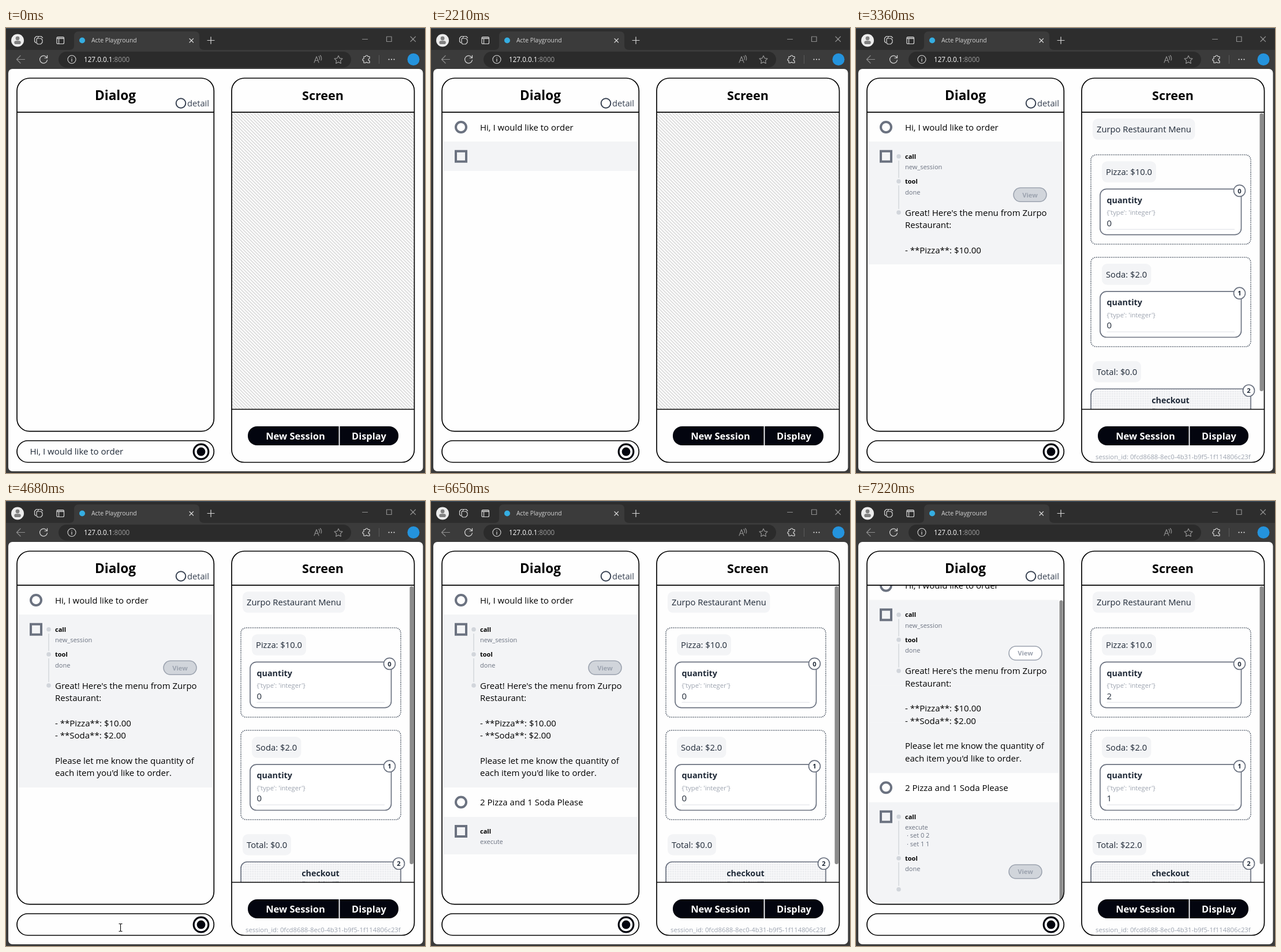
Write an HTML page that moves like this. It is 726x772 px and loops after 8000 ms.

```html
<!DOCTYPE html>
<html lang="en">
<head>
<meta charset="utf-8">
<title>Acte Playground</title>
<style>
html, body { margin: 0; width: 100%; height: 100%; overflow: hidden; background: #333; }
svg { display: block; width: 726px; height: 772px; }
text { font-family: "Open Sans", "Noto Sans", sans-serif; white-space: pre; }
.ic { fill: none; stroke: #d6d6d6; stroke-width: 1.2; stroke-linecap: round; stroke-linejoin: round; }
.dim { stroke: #8f8f8f; }
.line { fill: none; stroke: #000; stroke-width: 1.7; }
</style>
</head>
<body>
<svg id="stage" viewBox="0 0 726 772"></svg>
<script>
const LOOP = 8000;
const GRAY = '#6b7280', LIGHT = '#d1d5db', MUTED = '#9ca3af', PALE = '#f3f4f6', INK = '#1f2937', NIGHT = '#03050f';

// Drawing helpers
const text = (x, y, size, s, fill = '#000', extra = '') =>
  `<text x="${x}" y="${y}" font-size="${size}" fill="${fill}" ${extra}>${s}</text>`;
const bold = (x, y, size, s, fill, extra = '') => text(x, y, size, s, fill, 'font-weight="700" ' + extra);
const mid = 'text-anchor="middle"';
const rect = (x, y, x2, y2, r, fill, extra = '') =>
  `<rect x="${x}" y="${y}" width="${x2 - x}" height="${y2 - y}" rx="${r}" fill="${fill}" ${extra}/>`;
const circle = (x, y, r, fill, extra = '') => `<circle cx="${x}" cy="${y}" r="${r}" fill="${fill}" ${extra}/>`;
const stroke = (color, width) => `stroke="${color}" stroke-width="${width}"`;
const path = (d, cls) => `<path d="${d}" class="${cls}"/>`;
const during = (from, to, s) => `<g data-from="${from}" data-to="${to}">${s}</g>`;

const defs = `<defs>
  <pattern id="hatch" width="4" height="4" patternUnits="userSpaceOnUse" patternTransform="rotate(45)">
    <rect width="4" height="4" fill="#fff"/><rect width="4" height="2" fill="#dedede"/></pattern>
  <pattern id="mesh" width="3" height="3" patternUnits="userSpaceOnUse">
    <rect width="3" height="3" fill="#fcfcfd"/><rect width="1.2" height="1.2" fill="#c3c7ce"/></pattern>
  <clipPath id="dialogClip"><path d="M20 147H360V678a22 22 0 0 1-22 22H42a22 22 0 0 1-22-22Z"/></clipPath>
  <clipPath id="screenClip"><rect x="392" y="147" width="315" height="514"/></clipPath>
</defs>`;

function browser() {
  return rect(0, 0, 726, 772, 0, '#3b3b3b') + rect(0, 0, 726, 38, 0, '#2d2d2d') + rect(0, 0, 726, 1.2, 0, '#3d5163') +
    path('M110 38q8 0 8-8V14q0-8 8-8H327q8 0 8 8V30q0 8 8 8Z', 'tab') +
    rect(91, 41, 598, 68.5, 13.7, '#2b2b2b') +
    circle(20, 21.5, 11, '#ececec') + circle(20, 18, 3.4, '#808080') + rect(14.3, 22.3, 25.7, 28, 3, '#808080') +
    path('M54 18h6.5l2.5 2.5v4.5l-3 3h-5l-2-2v-7ZM51.500 25.500l-2-2v-6l3-3h6M55 17l2-2.500h4l2.500 2.500', 'ic') +
    path('M88 17.500a2 2 0 0 1 2-2h8.500a2 2 0 0 1 2 2v8a2 2 0 0 1-2 2H90a2 2 0 0 1-2-2ZM88 18.500h12.500M88 17h12.500M91.500 19v8', 'ic') +
    circle(132, 21.5, 5, '#35aee2') +
    text(148, 25.3, 10.4, 'Acte Playground', '#d4d4d4') +
    path('M318 18.500l6.500 6.500M324.500 18.500l-6.500 6.500M349 21.500h12M355 15.500v12', 'ic') +
    path('M617.500 19.500h9M659.500 15h8.500v8.500h-8.500ZM701 15l8.500 8.500M709.500 15l-8.500 8.500', 'ic dim') +
    path('M18.500 54.500h14M25 48l-6.500 6.500 6.500 6.500', 'ic dim') +
    path('M70.800 51.500a6.500 6.500 0 1 0 .7 4M71.500 47.500v4.500h-4.500', 'ic') +
    circle(114, 54.5, 7, 'none', stroke('#d6d6d6', 1.1)) + path('M114 53.500v4.500M114 51v.2', 'ic') +
    text(135, 58.8, 11.7, '127.0.0.1<tspan fill="#9a9a9a">:8000</tspan>', '#fff') +
    path('M534 60l4-10.500 4 10.500M535.500 56.500h5M542 49q2.500 2.500 1 6M544.500 47.500q3.500 4 1.500 8.500', 'ic dim') +
    path('M576 48l2.100 4.400 4.900.7-3.500 3.400.8 4.900-4.300-2.300-4.300 2.300.8-4.900-3.500-3.400 4.900-.7Z', 'ic dim') +
    path('M620 49.500h3a2 2 0 0 1 4 0h3v3.500a2 2 0 0 0 0 4v3.500h-3.500a2 2 0 0 0-3.500 0h-3v-3.500a2 2 0 0 1 0-4Z', 'ic') +
    rect(646, 47, 647, 62, 0, '#5c5c5c') +
    [663.5, 668, 672.5].map(x => circle(x, 54.5, 1.1, '#e0e0e0')).join('') +
    circle(706, 54.5, 10.5, '#2493dd') +
    rect(4, 71, 722.5, 769, 7, '#fefefe');
}

const row = (y, y2) => rect(21, y, 358.5, y2, 0, PALE);
const user = (y, s) => circle(52, y, 9, 'none', stroke(GRAY, 4)) + text(85, y + 5.5, 15, s);
const square = y => rect(43, y - 9, 61, y + 9, 0, 'none', stroke(GRAY, 4));
const dot = y => circle(74, y, 3.8, LIGHT);
const link = (y, y2) => rect(73.3, y, 74.7, y2, 0, LIGHT);
const label = (y, s) => bold(85, y + 4, 11, s);
const note = (y, s, x = 85) => text(x, y + 4, 11, s, GRAY);
const view = (x, y, fill) => rect(x, y - 12, x + 57, y + 12, 12, fill, stroke(MUTED, 1.6)) +
  bold(x + 28.5, y + 4.2, 11.2, 'View', MUTED, mid);
const lines = (first, list) => list.map((s, i) => text(85, 325.5 + (first + i) * 21.67, 15, s)).join('');

function dialog() {
  const reply = row(197, 345) + dot(222.7) + link(230, 260) + dot(266) + link(273, 314) + dot(320) +
    label(222.7, 'call') + note(241, 'new_session') + label(266, 'tool') + note(284.5, 'done');
  const result = row(548, 724) + dot(573) + link(580, 639) + dot(645) + link(652, 693) + dot(699) +
    note(605.5, '· set 0 2', 88) + note(620.3, '· set 1 1', 88) +
    label(645.3, 'tool') + note(663.5, 'done') + view(265, 668.3, LIGHT);
  return `<g clip-path="url(#dialogClip)"><g id="feed">` +
    during(1080, LOOP, user(172, 'Hi, I would like to order')) +
    during(2210, LOOP, row(197, 248)) +
    during(2320, LOOP, reply) +
    during(2320, 7050, view(273, 289.3, LIGHT)) +
    during(3360, LOOP, row(345, 410) + lines(0, ["Great! Here's the menu from Zurpo", 'Restaurant:', '', '- **Pizza**: $10.00'])) +
    during(3510, LOOP, row(410, 497) + lines(4, ['- **Soda**: $2.00', '', 'Please let me know the quantity of', "each item you'd like to order."])) +
    during(7050, LOOP, view(265, 289.3, '#fff')) +
    during(2210, LOOP, square(222.7)) +
    during(5500, LOOP, user(522.5, '2 Pizza and 1 Soda Please')) +
    during(6650, LOOP, row(548, 613)) +
    during(7050, LOOP, result) +
    during(6650, LOOP, square(573) + label(573, 'call') + note(591.3, 'execute')) +
    `</g>` +
    during(7050, LOOP, rect(351.3, 147, 360, 700, 0, '#fefefe') + `<g id="thumb">${rect(352.5, 147, 358.7, 670, 3, '#8b8b8b')}</g>`) +
    `</g>`;
}

const pill = (x, y, x2, s) => rect(x, y, x2, y + 36.5, 9, PALE) + text(x + 7, y + 23.7, 14.75, s, INK);
const badge = (x, y, n) => circle(x, y, 10, '#fff', stroke(GRAY, 1.7)) + bold(x, y + 4.2, 11.3, n, INK, mid);

function item(n, title, x2, count) {
  return `<g transform="translate(0 ${n * 177.8})">` +
    rect(407, 220, 684, 375, 9, 'none', stroke('#4b5563', 1.6) + ' stroke-dasharray="1.6 1.6"') +
    pill(426, 231.3, x2, title) +
    rect(423, 279.3, 667.5, 358.7, 11, '#fff', stroke(GRAY, 1.7)) + badge(664.5, 282.3, n) +
    bold(434.5, 303.5, 14.3, 'quantity', INK) + text(434.5, 324.3, 11.2, "{'type': 'integer'}", MUTED) +
    rect(434.5, 348.7, 656, 350, 0, '#e5e7eb') +
    during(0, 7050, text(434.5, 343.5, 15, '0', INK)) + during(7050, LOOP, text(434.5, 343.5, 15, count, INK)) + `</g>`;
}

function screen() {
  const menu = pill(410, 157.3, 587.5, 'Zurpo Restaurant Menu') +
    item(0, 'Pizza: $10.0', 520, 2) + item(1, 'Soda: $2.0', 511.5, 1) +
    during(0, 7050, pill(410, 578, 494, 'Total: $0.0')) + during(7050, LOOP, pill(410, 578, 503, 'Total: $22.0')) +
    rect(407, 626, 684, 705, 11, 'url(#mesh)', stroke(GRAY, 1.7)) + badge(680.5, 629, 2) +
    bold(545, 650.5, 14.3, 'checkout', INK, mid) + text(545, 668, 11.2, "{'type': 'null'}", GRAY, mid) +
    rect(699.5, 148, 706, 630, 3, '#8b8b8b');
  return during(0, 2320, rect(392, 147, 707, 661, 0, 'url(#hatch)')) +
    during(2320, LOOP, `<g clip-path="url(#screenClip)">${menu}</g>` +
      text(415, 748, 11.3, 'session_id: 0fcd8688-8ec0-4b31-b9f5-1f114806c23f', MUTED));
}

function frame() {
  const typed = s => text(41.5, 740.3, 15, s, INK), caret = rect(41.3, 726, 42.6, 744, 0, '#000');
  return rect(19, 87, 360.3, 699.7, 22, 'none', 'class="line"') +
    rect(391, 87, 707.5, 753.5, 22, 'none', 'class="line"') +
    rect(19, 716, 360.3, 753.5, 18.7, 'none', 'class="line"') +
    path('M19 146.200H360M391 146.200H707.500M391 661.500H707.500', 'line') +
    bold(189.5, 125, 22.6, 'Dialog', '#000', mid) + bold(549, 125, 21.5, 'Screen', '#000', mid) +
    circle(303, 130.5, 8.3, 'none', stroke('#374151', 2)) + text(314, 136, 14.7, 'detail', '#374151') +
    circle(338, 735, 12.8, '#fff', stroke(NIGHT, 3.2)) + circle(338, 735, 7.4, NIGHT) +
    rect(419, 691, 680, 724, 16, NIGHT) + rect(576.6, 691, 578.4, 724, 0, '#fff') +
    bold(501.5, 713.6, 16.5, 'New Session', '#fff', mid) + bold(629, 713.6, 16.4, 'Display', '#fff', mid) +
    during(0, 1080, typed('Hi, I would like to order')) + during(4940, 5500, typed('2 Pizza and 1 Soda Please')) +
    during(1230, 1750, caret) + during(4840, 4940, caret) + during(5680, 6190, caret);
}

const pointer = `<g id="arrow"><path d="M.6 .8V13l2.900-2.700 1.900 4.400 2-.9-1.900-4.200h3.900Z" fill="#fff" stroke="#000" stroke-width=".9"/></g>
  <g id="beam"><path d="M-3-6.500h2.200l.8.800.8-.8h2.200M0-6V6M-3 6.500h2.200l.8-.8.8.8h2.200" fill="none" stroke="#000" stroke-width="1.1"/></g>`;

// Pointer stops: time, shape, x, y
const stops = [
  [0], [140, 'beam', 168, 735], [220, 'arrow', 216, 705], [370, 'beam', 238.5, 725], [530, 'beam', 228, 725],
  [1230, 'arrow', 330, 650], [1340, 'arrow', 480, 575], [1450, 'arrow', 580, 525], [2210],
  [4040, 'arrow', 670, 422], [4200, 'arrow', 520, 545], [4290, 'arrow', 360, 660], [4370, 'beam', 232.5, 736],
  [4520, 'arrow', 214, 754], [4600, 'beam', 204, 746], [4680, 'beam', 198.5, 740], [5030, 'beam', 206.5, 726],
  [5200, 'arrow', 227, 706], [5340, 'arrow', 229, 705], [5680, 'arrow', 245, 696], [5760, 'arrow', 259, 689], [6650]
];

const stage = document.getElementById('stage');
stage.innerHTML = defs + browser() + dialog() + screen() + frame() + pointer;
stage.querySelector('.tab').setAttribute('fill', '#3b3b3b');

const get = id => document.getElementById(id);
const timed = [...stage.querySelectorAll('[data-from]')];

function render() {
  const t = performance.now() % LOOP;
  for (const g of timed) g.style.display = t >= +g.dataset.from && t < +g.dataset.to ? '' : 'none';
  const scroll = t < 7050 ? 0 : t < 7220 ? 10 : 25.3;
  get('feed').setAttribute('transform', `translate(0 ${-scroll})`);
  get('thumb').setAttribute('transform', `translate(0 ${scroll})`);
  const [, shape, x, y] = stops.findLast(s => s[0] <= t);
  for (const id of ['arrow', 'beam']) {
    get(id).style.display = id === shape ? '' : 'none';
    if (id === shape) get(id).setAttribute('transform', `translate(${x} ${y})`);
  }
  requestAnimationFrame(render);
}
render();
</script>
</body>
</html>
```
